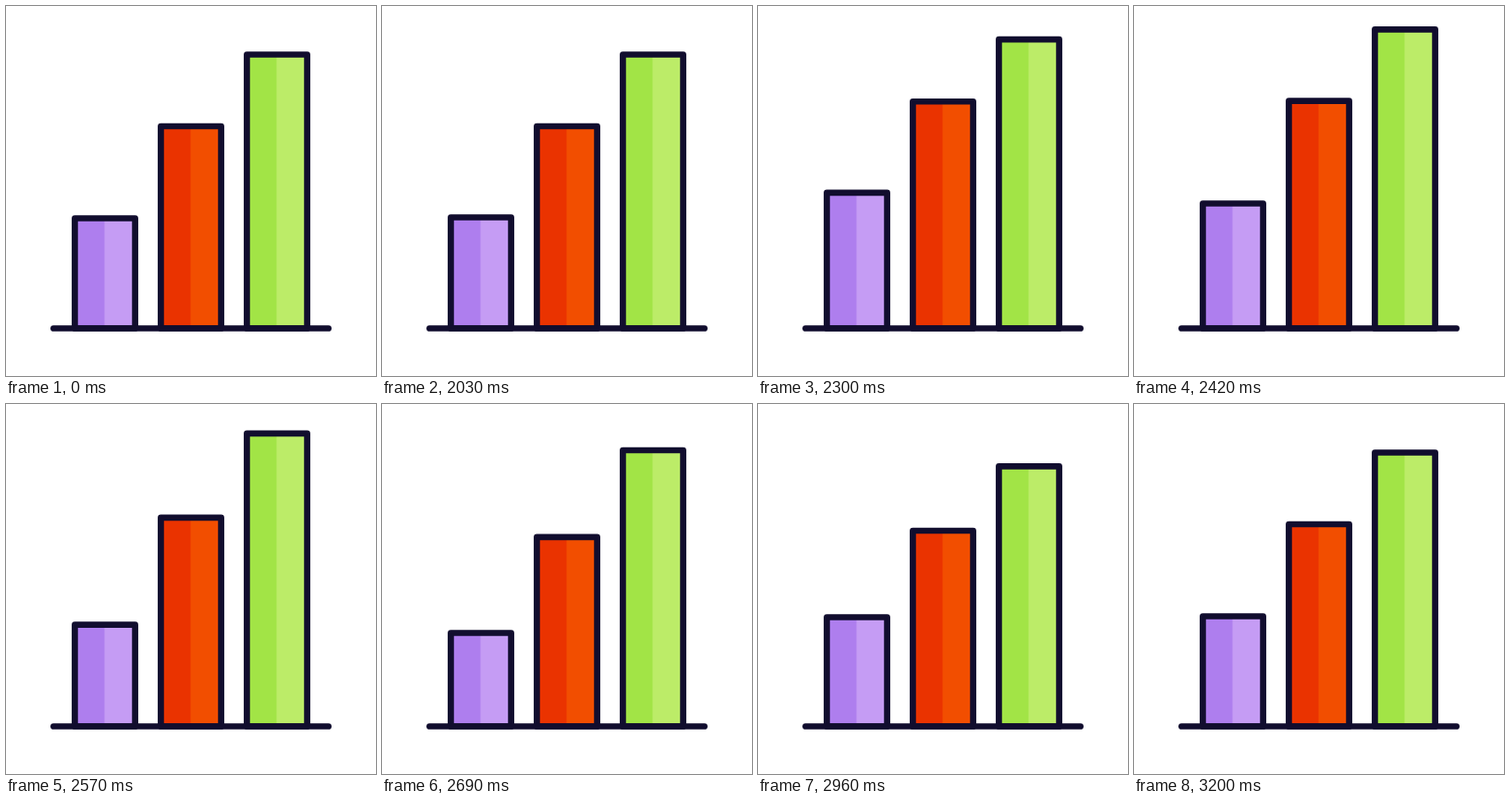
These frames come from a looping animation (400x400 px, 3.23 s). An HTML page:

```html
<!DOCTYPE html>
<html>
<head>
<meta charset="utf-8">
<style>
  html, body { margin: 0; width: 100%; height: 100%; overflow: hidden; background: #fff; }
  svg { display: block; width: 100vw; height: 100vh; }
</style>
</head>
<body>
<svg viewBox="0 0 400 400" fill="none" stroke="#110d2e" stroke-width="6.7" stroke-linecap="round" stroke-linejoin="round">
  <g id="bars"></g>
  <path d="M51.4 348.5H348.6"/>
</svg>
<script>
const LOOP = 3230, START = 2000, STEP = 30, STAGGER = 3;
const BASE = 348.5, WIDTH = 65.2;

const bars = [
  { x: 74.4, top: 229.5, dark: '#ae7eee', light: '#c59cf4' },
  { x: 167.4, top: 130, dark: '#ea3300', light: '#f24e00' },
  { x: 260.4, top: 52.5, dark: '#a2e446', light: '#bcec68' }
];

// Bounce height by step: rise, short hold, dip below rest, settle.
const keys = [
  [0, 0], [1, 1], [3, 11.3], [6, 25], [8.5, 27.3], [11, 27.3], [12, 25], [14, 16],
  [17, 2.5], [20, -13.8], [23, -18], [26, -14.8], [29, -7], [32, -1], [34, 0]
];

function slope(i) {
  if (i === 0 || i === keys.length - 1) return 0;
  const [a, b] = [keys[i - 1], keys[i + 1]];
  return (b[1] - a[1]) / (b[0] - a[0]);
}

function bounce(step) {
  const i = keys.findIndex(k => k[0] > step) - 1;
  if (i < 0) return 0;
  const [x0, y0] = keys[i], [x1, y1] = keys[i + 1];
  const h = x1 - x0, s = (step - x0) / h, r = 1 - s;
  return r * r * (1 + 2 * s) * y0 + s * s * (3 - 2 * s) * y1
    + h * s * r * (r * slope(i) - s * slope(i + 1));
}

const group = document.getElementById('bars');
function addRect(attrs) {
  const rect = document.createElementNS('http://www.w3.org/2000/svg', 'rect');
  for (const name in attrs) rect.setAttribute(name, attrs[name]);
  return group.appendChild(rect);
}

for (const bar of bars) {
  const half = WIDTH / 2 - 0.5;
  bar.parts = [
    addRect({ x: bar.x, width: WIDTH, fill: bar.dark, stroke: 'none' }),
    addRect({ x: bar.x + half, width: WIDTH - half, fill: bar.light, stroke: 'none' }),
    addRect({ x: bar.x, width: WIDTH })
  ];
}

function draw() {
  const step = Math.floor((performance.now() % LOOP - START) / STEP);
  bars.forEach((bar, i) => {
    const y = bar.top - bounce(step - i * STAGGER);
    for (const part of bar.parts) {
      part.setAttribute('y', y);
      part.setAttribute('height', BASE - y);
    }
  });
  requestAnimationFrame(draw);
}
draw();
</script>
</body>
</html>
```
